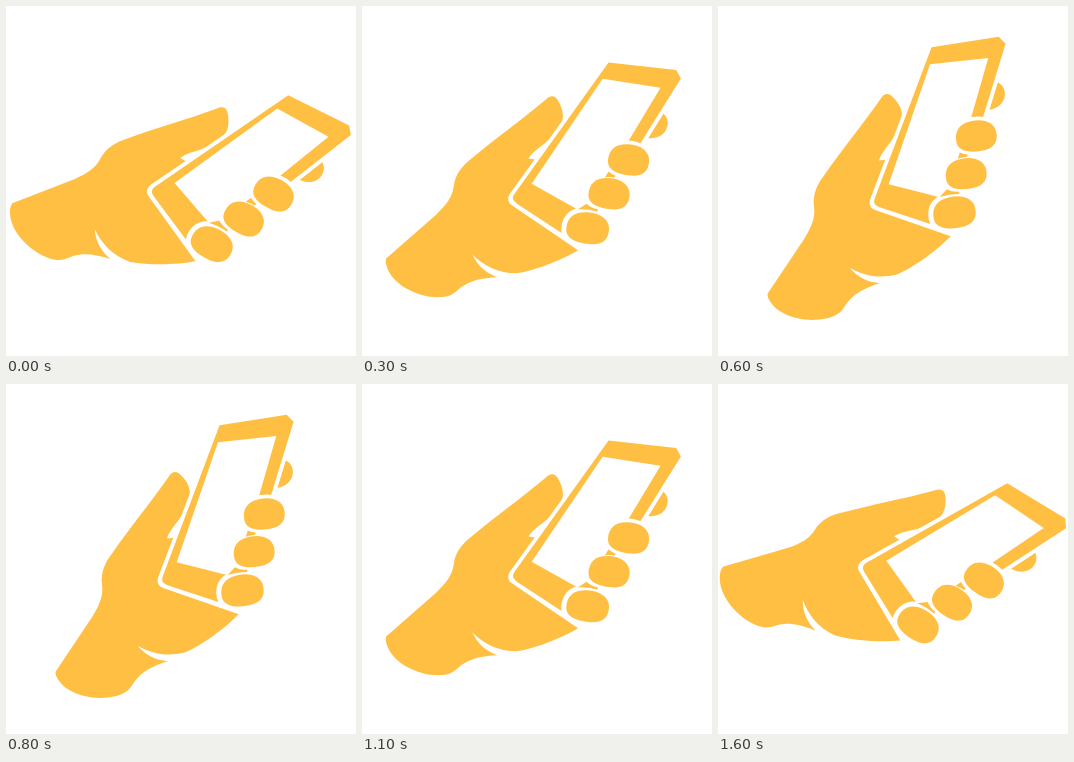
Write an HTML page that moves like this. It is 350 px wide and 350 px high and loops after 1.7 s.

```html
<!DOCTYPE html>
<html lang="en">
<head>
<meta charset="utf-8">
<title>Hand with phone</title>
<style>
  html, body { margin: 0; width: 100%; height: 100%; overflow: hidden; background: #fff; }
  svg { display: block; width: 100%; height: 100%; }
  .ink { fill: #ffbf43; }
  .rim { stroke: #fff; stroke-width: 7.6; paint-order: stroke; stroke-linejoin: round; }
  .wide { stroke-width: 9.6; }
</style>
</head>
<body>
<svg viewBox="0 0 350 350">
  <defs>
    <path id="finger" d="M-20.5 3C-21 -9 -14 -15 -2 -15.5C11 -16 20 -10 20.5 -1C21 9 16 15.5 3 15.5C-10 15.5 -20 12 -20.5 3Z"/>
  </defs>
  <g id="hand" class="ink">
    <!-- thumb, palm and wrist -->
    <path d="M31.500 265L78 216.500C87 206 92 198 92.500 188C93 174 100 165.500 108.500 157.500
      C131 135 153 116.500 176.500 93C181 87.500 186 87.500 189.500 93.500C194 100 196 106 195 112
      C194 120 189 127 181 135C174 142 168 146 164.500 153L171.500 153.500L148.500 191
      Q146.500 197 151 200.300L222 240C210 248.500 187 262 163 268.300C144 269.800 130 264 117 253.500
      C124 265 132 270.500 144 274C128 276 117 280 109 287C102 294 100 298 86 299.300
      C62 300.500 36 288 31.500 269Z"/>
    <path d="M295 96.500C301 101 301.500 108 298.500 114C295 120 289 122 282 122.500Z"/>
    <path class="rim" d="M236 50.500L304 52L309.500 60L221 233.500L157 199Q150.500 195.500 153.500 190Z"/>
    <path fill="#fff" d="M231.500 67L290 71L225.500 203L170 178Z"/>
    <use class="rim" href="#finger" x="264.5" y="145.700"/>
    <use class="rim" href="#finger" x="248" y="181"/>
    <use class="rim wide" href="#finger" transform="translate(229.7 217.2) scale(1.04 1.02)"/>
    <!-- phone edge between the fingers -->
    <path d="M218 199.500L226.500 193Q231 197 238 197.500V200Q228 198 218 199.500Z"/>
    <path d="M242.500 165L245.500 159Q249 161.500 253 162.500L252 164.500Q247 164 242.500 165Z"/>
  </g>
</svg>
<script>
  const hand = document.getElementById("hand");
  const STEP = 100, COUNT = 17, PEAK = 7;

  // Swing of 5 degrees per step; the opening step covers two.
  function angle(step) {
    return step === 0 ? 25 : 5 * Math.abs(step - PEAK) - 15;
  }

  function draw(now) {
    const step = Math.floor(now / STEP) % COUNT;
    hand.setAttribute("transform", `rotate(${angle(step)} 171.5 174.2)`);
  }

  const start = performance.now();
  function tick() {
    draw(performance.now() - start);
    requestAnimationFrame(tick);
  }
  tick();
</script>
</body>
</html>
```
